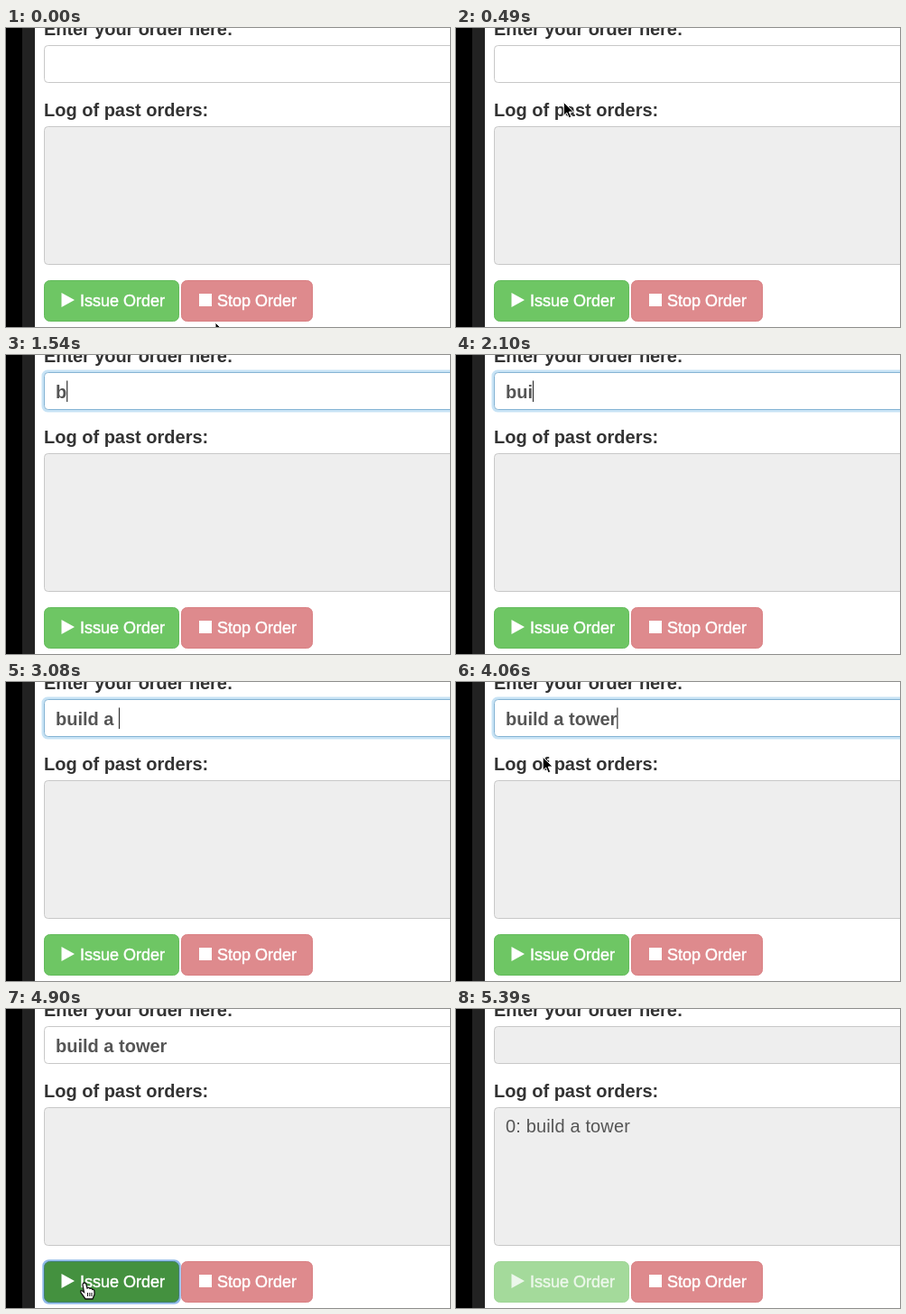
These frames come from a looping animation (492 by 332 pixels, 5810 ms). An HTML page:

```html
<!DOCTYPE html>
<html lang="en">
<head>
<meta charset="utf-8">
<title>Order form</title>
<style>
  html, body { margin: 0; height: 100%; overflow: hidden; background: #fff; }
  svg { display: block; width: 492px; height: 332px; }
  text { font: 20px "Liberation Sans", Arial, sans-serif; fill: #555; white-space: pre; }
  .label { font-weight: bold; fill: #333; }
  #typed { font-weight: bold; }
  .btn { font-size: 18px; fill: #fff; stroke: #fff; stroke-width: .5; }
</style>
</head>
<body>
<svg viewBox="0 0 492 332">
  <rect width="492" height="332" fill="#fff"/>
  <rect width="18" height="332"/>
  <rect x="18" width="14" height="332" fill="#222"/>

  <text class="label" x="42" y="8" letter-spacing="-.08">Enter your order here:</text>
  <rect id="glow" x="41" y="18" width="480" height="44" rx="5" fill="none" stroke="#b9dcf3" stroke-width="3"/>
  <rect id="input" x="42.5" y="19.5" width="480" height="41" rx="4"/>
  <text id="typed" x="55" y="48"></text>
  <path id="caret" stroke="#333" stroke-width="1.2"/>

  <text class="label" x="42" y="98">Log of past orders:</text>
  <rect x="42.5" y="109.5" width="480" height="153" rx="4" fill="#eee" stroke="#c8c8c8"/>
  <text id="log" x="55" y="137" letter-spacing=".15">0: build a tower</text>

  <rect id="ring" x="41.5" y="279.5" width="151" height="47" rx="6" fill="none" stroke="#8fb9ea" stroke-width="2.5"/>
  <rect id="issue" x="42.5" y="280.5" width="149" height="45" rx="6"/>
  <g id="issueFace">
    <path d="M61.500 294V310L76 302Z" fill="#fff"/>
    <text class="btn" x="82" y="309">Issue Order</text>
  </g>
  <rect x="194.500" y="280.500" width="145" height="45" rx="6" fill="#de8a8d" stroke="#d97f82"/>
  <path d="M214 295H228V309H214Z" fill="#fff"/>
  <text class="btn" x="234" y="309">Stop Order</text>

  <g id="mouse">
    <circle id="press" r="15" fill="none" stroke="#000" stroke-width="3"/>
    <path id="beam" d="M-3-7Q0-7 0-5Q0-7 3-7M0-5V6M-3 8Q0 8 0 6Q0 8 3 8M-2 2H2" fill="none" stroke="#333" stroke-width="1.2"/>
    <path id="arrow" d="M0 0V15L3.500 11.700L6 17.500L8.500 16.400L6 10.800H11Z" stroke="#fff"/>
    <g id="hand">
      <path d="M-2 1.500Q-2-1 0-1Q1.700-1 2 1L3 5Q5 3.500 6 5.500Q8 4.500 8.700 6.500Q11 6 11 9V12L9 17H1L-4 10Q-5 7-2.500 8L-.5 9.500Z" fill="#fff" stroke="#111" stroke-width="1.3"/>
      <path d="M3.500 10V14M5.800 10V14M8 10V14" stroke="#111"/>
    </g>
  </g>
</svg>
<script>
const LOOP = 5810, STEP = 70;
const BLUR = 4830, SENT = 5110;
const el = id => document.getElementById(id);
const set = (id, attrs) => { for (const k in attrs) el(id).setAttribute(k, attrs[k]); };
const show = (id, on) => { el(id).style.display = on ? "" : "none"; };
const between = (t, a, b) => t >= a && t < b;

// [time, number of letters typed]
const ORDER = "build a tower";
const KEYS = [[980, 0], [1540, 1], [1750, 2], [2100, 3], [2520, 4], [2730, 5], [2870, 6],
  [3010, 7], [3080, 8], [3290, 10], [3500, 11], [3570, 12], [3710, 13]];

// [time, x, y] of the pointer
const PATH = [[0, 232, 327], [630, 103, 47], [840, 99, 45], [3920, 99, 45],
  [4480, 81, 290], [4550, 81, 292], [4830, 87, 305], [5110, 87, 305], [5390, 143, 340]];

function pointer(t) {
  const i = PATH.findIndex(p => p[0] > t);
  if (i < 0) return PATH.at(-1).slice(1);
  const [t0, x0, y0] = PATH[i - 1], [t1, x1, y1] = PATH[i];
  const u = (t - t0) / (t1 - t0), e = u * u * (3 - 2 * u);
  return [x0 + (x1 - x0) * e, y0 + (y1 - y0) * e];
}

function drawPointer(t) {
  const [x, y] = pointer(t);
  const beam = between(y, 19, 61);
  const hand = !beam && t < SENT && between(x, 42, 192) && between(y, 280, 326);
  set("mouse", { transform: `translate(${x} ${y})` });
  show("mouse", !between(t, 1540, 3990));
  show("beam", beam);
  show("hand", hand);
  show("arrow", !beam && !hand);
  show("press", between(t, 980, 1120));
}

function drawInput(t) {
  const [since, count] = KEYS.findLast(k => k[0] <= t) || [0, 0];
  const focus = between(t, 1050, BLUR), sent = t >= SENT;
  const typed = el("typed");
  typed.textContent = sent ? "" : ORDER.slice(0, count);
  const x = 55.5 + (count ? typed.getComputedTextLength() : 0);
  set("caret", { d: `M${x} 28.500V52` });
  show("caret", between(t, 980, BLUR) && (t - since) % 1000 < 600);
  set("input", { fill: sent ? "#eee" : "#fff", stroke: focus ? "#86b4d4" : "#c8c8c8" });
  show("glow", focus);
  set("glow", { opacity: t < 1120 ? .4 : .8 });
  show("log", sent);
}

function drawButton(t) {
  const sent = t >= SENT, down = between(t, BLUR, SENT);
  set("issue", {
    fill: sent ? "#a4da9b" : down ? "#44913f" : "#6ec664",
    stroke: sent ? "#9fd596" : down ? "#3f7f6a" : "#63bb5b"
  });
  set("issueFace", { opacity: sent ? .8 : 1 });
  show("ring", down);
}

function frame(now) {
  const t = Math.floor(now % LOOP / STEP) * STEP;
  drawInput(t);
  drawButton(t);
  drawPointer(t);
  requestAnimationFrame(frame);
}
frame(0);
</script>
</body>
</html>
```
